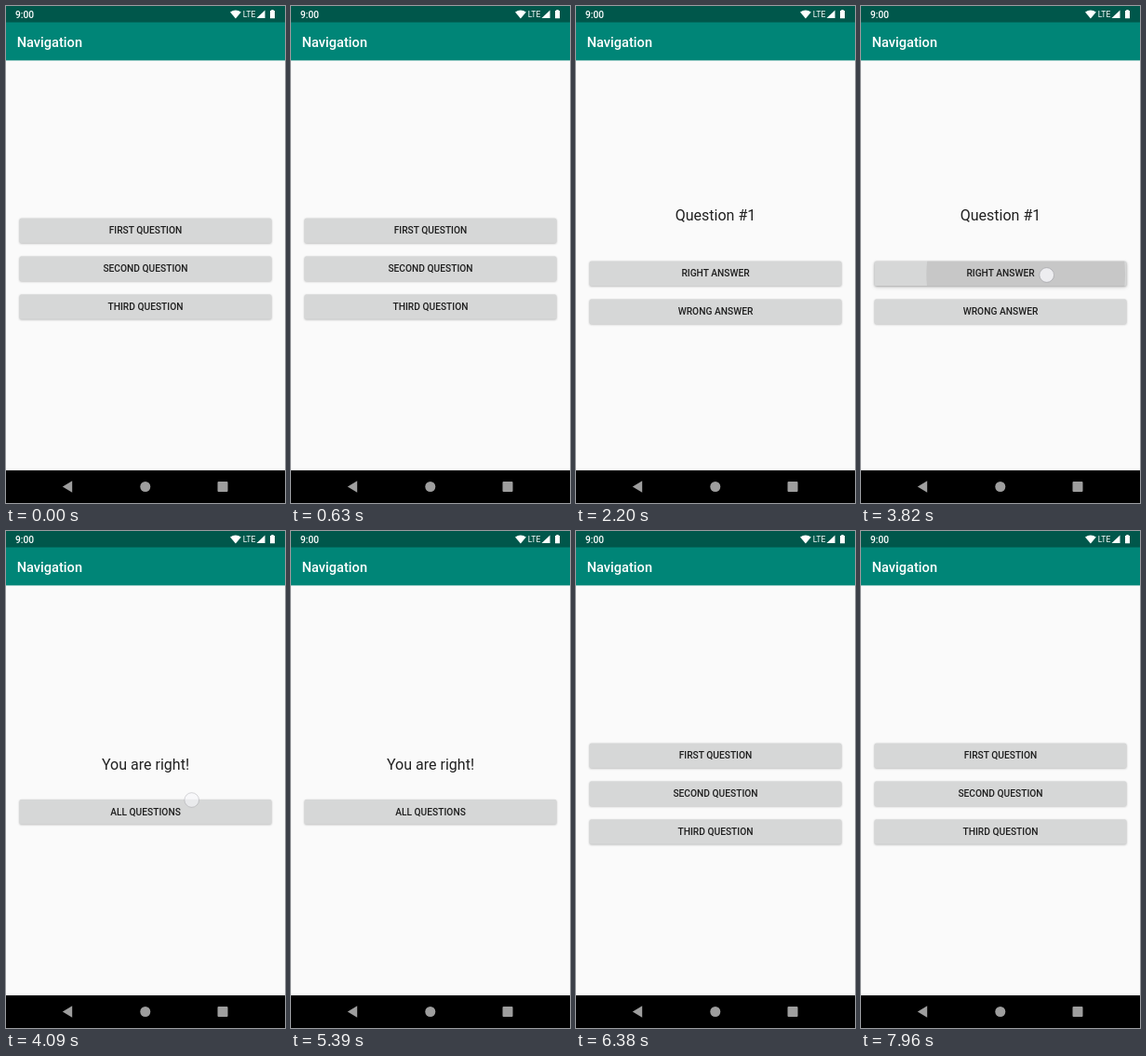
Animation, 300 px wide and 533 px high, one loop 8000 ms. Source, as an HTML page:

```html
<!DOCTYPE html>
<html lang="en">
<head>
<meta charset="utf-8">
<title>Navigation</title>
<style>
  html, body { margin: 0; width: 100%; height: 100%; overflow: hidden; background: #fafafa; }
  svg { display: block; width: 300px; height: 533px; font-family: Roboto, sans-serif; }
  .label { font-size: 10.22px; font-weight: 500; fill: #1e1e1e; text-anchor: middle; }
  .heading { font-size: 16.06px; fill: #212121; text-anchor: middle; }
</style>
</head>
<body>
<svg viewBox="0 0 300 533">
  <defs>
    <filter id="near" x="-5%" y="-30%" width="110%" height="160%">
      <feGaussianBlur stdDeviation=".8"/>
    </filter>
    <filter id="far" x="-5%" y="-60%" width="110%" height="220%">
      <feGaussianBlur stdDeviation="2"/>
    </filter>
  </defs>
  <rect width="300" height="533" fill="#fafafa"/>
  <g id="screens"></g>
  <circle id="touch" r="7.8" fill="#f6f6fa" fill-opacity=".8" stroke="#88888e" stroke-opacity=".55" stroke-width=".8"/>

  <rect y="17" width="300" height="41.4" fill="#008577"/>
  <rect width="300" height="17.5" fill="#00574b"/>
  <g fill="#fff">
    <text x="11.7" y="43.7" font-size="14.6" font-weight="500">Navigation</text>
    <text x="10" y="12.7" font-size="10.2" font-weight="500">9:00</text>
    <text x="254.8" y="12.2" font-size="8.6">LTE</text>
    <path d="M241 6.5Q246.9 2.6 252.8 6.5L246.9 13.5Z"/>
    <path d="M278.5 4.5V13H269.5Z"/>
    <path d="M284 5H285.3V4H287.7V5H289V13.2H284Z"/>
  </g>

  <rect y="498" width="300" height="35" fill="#000"/>
  <g fill="#9e9e9e">
    <path d="M60.8 515.5L71.2 509.3V521.7Z"/>
    <circle cx="149.8" cy="515.5" r="5.5"/>
    <rect x="227.5" y="510" width="11" height="11" rx="1"/>
  </g>
</svg>
<script>
const LOOP = 8000;
const BUTTON = { x: 14.6, width: 270.8, height: 26.4, rx: 1.5 };
const PITCH = 40.88;
const screens = document.getElementById('screens');
const touch = document.getElementById('touch');

function add(parent, tag, attrs, text = '') {
  const el = document.createElementNS('http://www.w3.org/2000/svg', tag);
  set(el, attrs);
  el.textContent = text;
  parent.append(el);
  return el;
}

function set(el, attrs) {
  for (const key in attrs) el.setAttribute(key, attrs[key]);
}

function addButton(group, label, y) {
  const box = { ...BUTTON, y };
  add(group, 'rect', { ...box, y: y + .6, fill: '#000', filter: 'url(#near)', opacity: .28 });
  const shadow = add(group, 'rect', { ...box, y: y + 2, fill: '#000', filter: 'url(#far)', opacity: 0 });
  add(group, 'rect', { ...box, fill: '#d6d7d7' });
  const clip = add(group, 'clipPath', { id: 'clip' + label.replace(/ /g, '') });
  add(clip, 'rect', box);
  const ripple = add(group, 'circle', { fill: '#bbbcbc', 'clip-path': `url(#${clip.id})`, opacity: 0 });
  add(group, 'text', { class: 'label', x: 150, y: y + 16.7 }, label);
  return { shadow, ripple, middle: y + BUTTON.height / 2 };
}

function addScreen(heading, headingY, firstY, labels) {
  const group = add(screens, 'g', {});
  if (heading) add(group, 'text', { class: 'heading', x: 150, y: headingY }, heading);
  const buttons = labels.map((label, i) => addButton(group, label, firstY + i * PITCH));
  return { group, buttons };
}

const menu = addScreen('', 0, 227.7, ['FIRST QUESTION', 'SECOND QUESTION', 'THIRD QUESTION']);
const question = addScreen('Question #1', 229.6, 273.7, ['RIGHT ANSWER', 'WRONG ANSWER']);
const result = addScreen('You are right!', 255.8, 288.1, ['ALL QUESTIONS']);

// Each tap presses the first button of a screen, then opens the next one.
const taps = [
  { from: menu, to: question, down: 1640, up: 1880, x: 200, y: 242 },
  { from: question, to: result, down: 3780, up: 4040, x: 199.7, y: 288.5 },
  { from: result, to: menu, down: 5560, up: 5880, x: 171, y: 304 }
];

const clamp = v => Math.max(0, Math.min(1, v));
const easeOut = v => 1 - (1 - v) ** 3;
const mix = (a, b, k) => a + (b - a) * k;

// The ripple grows while its centre drifts from the finger to the button's middle.
function press({ from, down, up, x, y }, t) {
  const { shadow, ripple, middle } = from.buttons[0];
  const held = t >= down && t < up;
  const k = easeOut(clamp((t - down) / 225));
  shadow.setAttribute('opacity', held ? .3 * clamp((t - down) / 100) : 0);
  set(ripple, {
    cx: mix(x, 150, k),
    cy: mix(y, middle, k),
    r: mix(82, 137, k),
    opacity: held ? clamp((t - down) / 75) : 0
  });
}

function draw(t) {
  let current = menu;
  let touchAlpha = 0;
  for (const tap of taps) {
    const { to, down, up, x, y } = tap;
    press(tap, t);
    if (t >= up) current = to;
    if (t >= down && t < up + 200) {
      touchAlpha = clamp(1 - (t - up) / 200);
      set(touch, { cx: x, cy: y });
    }
  }
  touch.setAttribute('opacity', touchAlpha);
  for (const screen of [menu, question, result])
    screen.group.setAttribute('display', screen === current ? 'inline' : 'none');
}

const start = performance.now();
function tick() {
  draw((performance.now() - start) % LOOP);
  requestAnimationFrame(tick);
}
tick();
</script>
</body>
</html>
```
